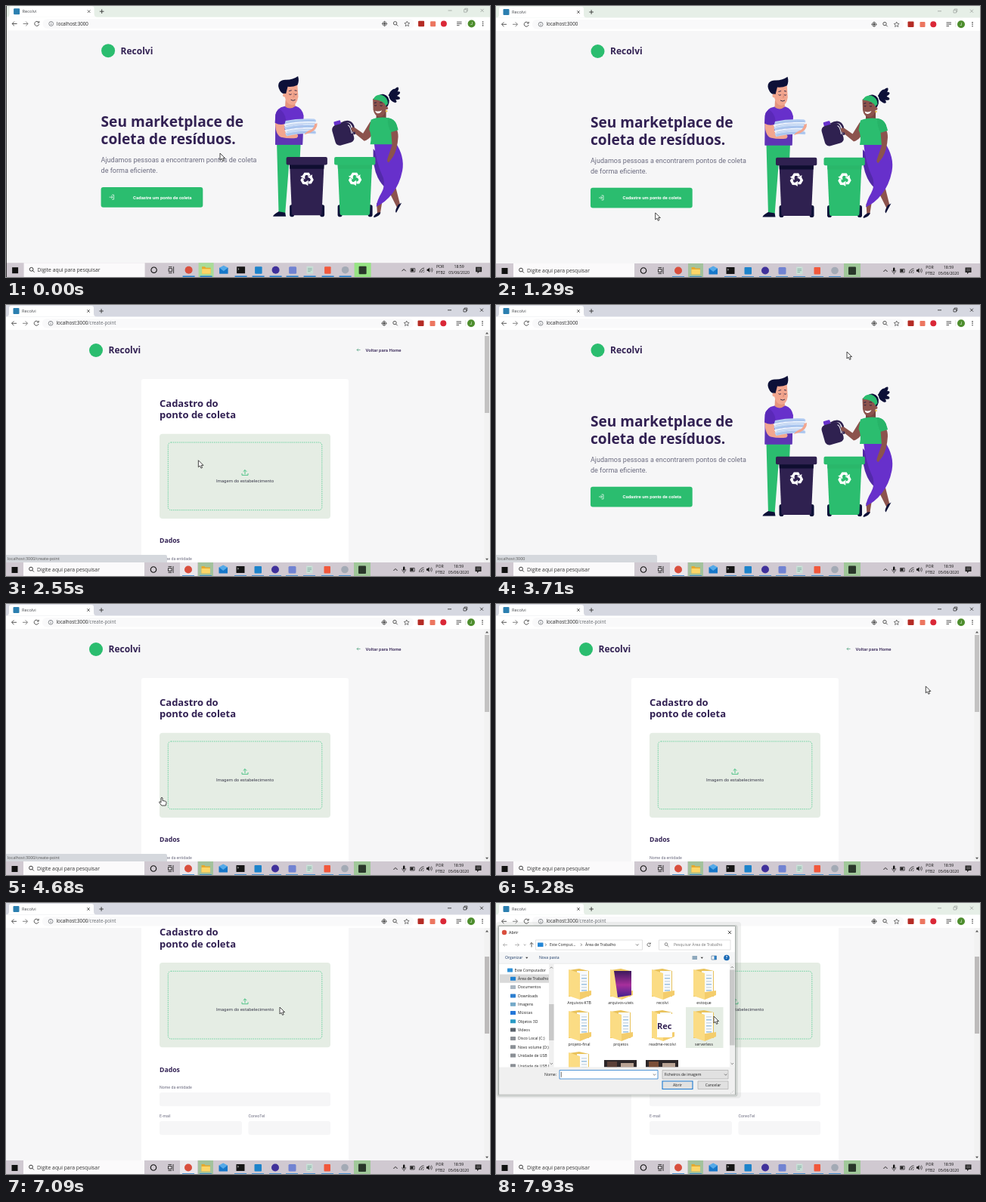
Write an HTML page with a canvas that moves like this. It is 640 px wide and 359 px high and loops after 7990 ms.

```html
<!DOCTYPE html>
<html lang="pt">
<head>
<meta charset="utf-8">
<title>Recolvi</title>
<style>
html, body { margin: 0; width: 100%; height: 100%; overflow: hidden; background: #f6f6f7; }
canvas { display: block; width: 640px; height: 359px; }
</style>
</head>
<body>
<canvas id="stage"></canvas>
<script>
const LOOP = 7990, W = 640, H = 359;
const canvas = document.getElementById('stage');
const ctx = canvas.getContext('2d');
const dpr = Math.max(1, window.devicePixelRatio || 1);
canvas.width = W * dpr;
canvas.height = H * dpr;

const UI = '"Open Sans", sans-serif', BODY = 'Roboto, sans-serif', HEAD = '"Noto Sans", sans-serif';
const INK = '#322153', GREEN = '#2bbd6f', NAVY = '#0d1038', PURPLE = '#6730cb', BIN = '#2f2150';
const BROWN = '#8c534d', SKIN = '#f2a68f', PALE = '#e5ede4', GREY = '#5c6066';

// Drawing helpers
function rect(x, y, w, h, fill, r = 0) {
  ctx.fillStyle = fill;
  ctx.beginPath();
  ctx.roundRect(x, y, w, h, r);
  ctx.fill();
}
function frame(x, y, w, h, color, lw = 0.7, r = 0) {
  ctx.strokeStyle = color;
  ctx.lineWidth = lw;
  ctx.beginPath();
  ctx.roundRect(x, y, w, h, r);
  ctx.stroke();
}
function dot(x, y, r, fill) {
  ctx.fillStyle = fill;
  ctx.beginPath();
  ctx.arc(x, y, r, 0, 7);
  ctx.fill();
}
function oval(x, y, rx, ry, rot, fill) {
  ctx.fillStyle = fill;
  ctx.beginPath();
  ctx.ellipse(x, y, rx, ry, rot, 0, 7);
  ctx.fill();
}
function shape(d, fill) {
  ctx.fillStyle = fill;
  ctx.fill(new Path2D(d));
}
function line(d, color = GREY, lw = 0.9) {
  ctx.strokeStyle = color;
  ctx.lineWidth = lw;
  ctx.stroke(new Path2D(d));
}
function text(s, x, y, size, color, font = UI, weight = 400, align = 'left') {
  ctx.font = `${weight} ${size}px ${font}`;
  ctx.textAlign = align;
  ctx.fillStyle = color;
  ctx.fillText(s, x, y + size * 0.36);
}
function at(x, y, rot, draw) {
  ctx.save();
  ctx.translate(x, y);
  ctx.rotate(rot);
  draw();
  ctx.restore();
}
function lens(x, y, r, color) {
  line(`M${x + r} ${y}a${r} ${r} 0 1 0 ${-2 * r} 0a${r} ${r} 0 1 0 ${2 * r} 0M${x + r * 0.7} ${y + r * 0.7}l2.2 2.2`, color);
}

// Keyed motion: rows of [time, ...values]
function track(keys, t) {
  let i = 0;
  while (i < keys.length - 2 && t >= keys[i + 1][0]) i++;
  const a = keys[i], b = keys[i + 1];
  const k = Math.min(1, Math.max(0, (t - a[0]) / (b[0] - a[0])));
  return a.slice(1).map((v, j) => v + (b[j + 1] - v) * k);
}
const pointer = [
  [0, 283, 195], [130, 283, 195], [250, 360, 190], [420, 518, 262], [620, 400, 338], [920, 209, 312],
  [1250, 212, 275], [1700, 198, 263.5], [1960, 198, 263.5], [2610, 260, 200], [3050, 372, 126], [3400, 464, 62],
  [3720, 464, 62], [4250, 240, 240], [4450, 205, 256], [4700, 205, 256], [5000, 400, 185], [5280, 568, 109],
  [5520, 637, 88], [6050, 637, 90], [6170, 637, 101.7], [6410, 637, 118], [6610, 637, 118],
  [7030, 362, 138], [7180, 362, 138], [7390, 308, 147], [7700, 288, 150], [7990, 288, 150]
];
const scrolling = [[5990, 0], [6050, 8], [6170, 42], [6410, 91.7], [7990, 91.7]];

function drawTabs(active, url) {
  rect(-2, -2, 644, 20, active ? '#d6d8e1' : '#e6efe7');
  shape('M0 15.5Q4 15.5 4 11V4Q4 1 7 1H113Q116 1 116 4V11Q116 15.5 120 15.5Z', '#fff');
  rect(9.5, 4, 8, 8, '#2b7fb0', 1);
  text('Recolvi', 21, 8, 5.7, '#45494d');
  line('M107.2 6.2l3.6 3.6m0-3.6l-3.6 3.6', '#444', 0.8);
  line('M123.3 8h5.6m-2.8-2.8v5.6', '#333');
  const control = active ? '#222' : '#9a9f9b';
  line('M584 6.8h5', control, 0.8);
  line('M605 5.4h3.6v3.6h-3.6zM606.2 5.2v-1.2h3.6v3.6h-1.2', control, 0.7);
  line('M627 4.7l4 4m0-4l-4 4', control, 0.8);

  rect(-2, 15.5, 644, 17.5, '#fff');
  rect(48, 18, 491, 12.5, '#f9f9fa', 6);
  line('M14 24.3h-6.4m2.8-2.9l-2.9 2.9l2.9 2.9', '#444');
  line('M22 24.3h6.4m-2.8-2.9l2.9 2.9l-2.9 2.9', '#777');
  line('M42.6 22.4a3 3 0 1 0 .5 2.6M43.2 20.8v2.2h-2.2', '#444');
  line('M62 24.3a2.9 2.9 0 1 0-5.8 0a2.9 2.9 0 1 0 5.8 0M59.1 23.8v2M59.1 22.2v.7', GREY, 0.7);
  text('localhost:3000', 66.5, 24.2, 6.2, '#222');
  if (url) text(url, 66.5 + ctx.measureText('localhost:3000').width, 24.2, 6.2, '#666a70');

  line('M502.7 24.3a2.7 2.7 0 1 0-5.4 0a2.7 2.7 0 1 0 5.4 0M500 20.6v7.4M496.3 24.3h7.4', '#444', 0.7);
  dot(500, 24.3, 1.2, '#444');
  lens(514, 23.6, 2.2, '#444');
  line('M529.7 21l1 2.2 2.4.3-1.8 1.6.5 2.4-2.1-1.2-2.1 1.2.5-2.4-1.8-1.6 2.4-.3z', '#444', 0.7);
  rect(544.5, 20.5, 8, 7.5, '#b52c25', 1);
  rect(560.5, 21, 7, 7, '#ec7660', 1);
  dot(578.3, 24.3, 4, '#da2837');
  line('M595.5 22h6.5m-6.5 2.2h6.5m-6.5 2.3h3.5', '#444');
  line('M607.5 20v8', '#ddd', 0.6);
  dot(615, 24.3, 5, '#4d8d2d');
  text('J', 615, 24.3, 5, '#fff', BODY, 400, 'center');
  for (const dy of [-2.4, 0, 2.4]) dot(630, 24.3 + dy, 0.8, '#444');
}

function drawTaskbar(active, idle) {
  rect(-2, 341, 644, 22, '#d0c9d1');
  rect(7.5, 347, 8, 8, '#111');
  rect(23, 341, 160, 22, '#fbfafb');
  lens(33, 349.6, 2.4, '#222');
  text('Digite aqui para pesquisar', 41, 350.6, 6.8, '#333');
  line('M198.7 350.5a3.7 3.7 0 1 0-7.4 0a3.7 3.7 0 1 0 7.4 0', '#111', 1.1);
  line('M214.5 348.5h4.5v4h-4.5zM214.5 346.5h4.5M214.5 354.5h4.5M221 346v9', '#111', 0.8);
  if (active) rect(230, 341, 23, 22, '#ebe7eb');
  rect(254, 341, 20, 22, idle ? '#a9dc98' : '#a3c29c');
  rect(460, 341, 22, 22, idle ? '#97e484' : '#a1c89a');
  dot(241, 350.5, 5, '#d94f3e');
  shape('M258.5 346h4l1 1.5h6.5v8h-11.5z', '#e6a92c');
  rect(258.5, 349, 11.5, 6.5, '#fcd667', 0.5);
  rect(281.5, 347.5, 11.5, 8, '#1677c9', 0.5);
  shape('M281.5 347.5L287.2 344.5L293 347.5L287.2 352Z', '#54a9e8');
  rect(304.5, 346, 11, 9, '#151515', 0.5);
  line('M306 348.3l1.5 1-1.5 1', '#fff', 0.6);
  rect(328.5, 346, 9.5, 9.5, '#1d83ca', 1);
  dot(356, 350.5, 5, '#40319b');
  rect(373.5, 346, 10, 9.5, '#7183d2', 1.5);
  rect(397, 345.5, 8.5, 10, '#c8dfd6', 0.6);
  line('M398.5 348.5h5.5m-5.5 2h5.5m-5.5 2h3.5', '#65948c', 0.6);
  rect(420.5, 346, 8.5, 9.5, '#f1583c', 1);
  dot(448, 350.5, 4.8, '#a3aab5');
  rect(466, 345.5, 10, 10.5, '#29372a', 1);
  for (const x of [241, 264, 310, 333, 356, 378, 401, 425, 448]) rect(x - 8, 358.2, 16, 2, '#2a82cf');
  const up = idle ? 525.5 : 515;
  line(`M${up - 2.6} 352l2.6-2.6 2.6 2.6`, '#111', 0.9);
  if (!idle) {
    rect(525, 346.5, 2.4, 5.2, '#111', 1.2);
    line('M523.7 350q0 3.5 2.5 3.5t2.5-3.5M526.2 353.5v2', '#111', 0.6);
  }
  frame(534.5, 348.5, 5.6, 4.5, '#111');
  rect(535.2, 349.2, 3.2, 3.1, '#111');
  line('M546.5 354a6 6 0 0 1 6-6M548.8 354a3.6 3.6 0 0 1 3.7-3.6M551 354l1.5-1.5', '#222', 0.8);
  shape('M556 349.2h1.5l2-2v6.6l-2-2H556z', '#111');
  line('M560.8 348.6q1.4 1.9 0 3.8M562.4 347.5q2.2 3 0 6', '#111', 0.6);
  text('POR', 573.5, 346.2, 5.2, '#111', UI, 400, 'center');
  text('PTB2', 574, 354.2, 5.2, '#111', UI, 400, 'center');
  text('18:59', 598.5, 346.2, 5.2, '#111', UI, 400, 'center');
  text('05/06/2020', 598.5, 354.2, 5.2, '#111', UI, 400, 'center');
  shape('M620.5 346.5h8v6.5h-3.5l-2 2.2v-2.2h-2.5z', '#222');
  line('M622 348.7h5m-5 2h5', '#d0c9d1', 0.5);
}

function recycle(x, y) {
  for (let k = 0; k < 3; k++) at(x, y, k * Math.PI * 2 / 3, () => {
    line('M-5.2 -2.4L-2.5 -6.6H1.8L3.2 -4.2', '#fff', 3.4);
    shape('M.7 -2.4L7.2 -5.8L6.3 .2Z', '#fff');
  });
}
function bin(x, color, shade) {
  rect(x + 4.5, 264, 6, 16, NAVY, 2.8);
  rect(x + 44.5, 264, 6, 16, NAVY, 2.8);
  shape(`M${x + 4.5} 209H${x + 50}L${x + 47} 275Q${x + 46.8} 278 ${x + 44} 278H${x + 10}Q${x + 7.6} 278 ${x + 7.4} 275Z`, color);
  shape(`M${x + 4.5} 210H${x + 50}L${x + 49.7} 216.5H${x + 4.8}Z`, shade);
  rect(x, 200.8, 54.3, 10.4, color, 2);
  recycle(x + 27.3, 229.8);
}

function drawMan() {
  shape('M357.5 183H389L388 205H374L368.5 277H360Z', GREEN);
  shape('M360 273L368.5 274.5L369.5 279.5H352.5Q352.5 277 360 273Z', NAVY);
  shape('M363 135Q372 131.5 383 133.5Q391 136 393 146L391.5 184.5H355.5V150Q355 139 363 135Z', PURPLE);
  shape('M356 165H392L391.5 184.5H355.5Z', '#5e35b4');
  shape('M369 125H381L382 133.5Q375 139 368.5 134Z', '#e5937d');
  shape('M367.5 106Q378 103 384.8 106L385.8 121Q384 132 377.5 132Q370 131 368 121Z', SKIN);
  shape('M362 113.5Q357.5 106 361 101.5Q364.5 98 370 98.5Q379 98.5 385.5 93.8Q387.5 100 384.8 105.5Q378 108.5 372 107.5L369.5 117Q364.5 117.5 362 113.5Z', NAVY);
  dot(367.8, 119, 2.4, SKIN);
  line('M373.5 113.5l3.6-1M381 112.5l3 .6M373.6 117.5q1.6 1.6 3.4 0M381 117.5q1.5 1.6 3 0M376 125q3 2.2 6 0', NAVY, 0.8);
  line('M379.6 116l1 5h-2', '#d57f69', 0.7);

  shape('M355.5 153Q355 171 363 174.5Q374 177 384 175.5Q388 172 382 168.5L368 165V154Z', SKIN);
  for (let i = 0; i < 5; i++) {
    const y = 152.6 + i * 3.9, x = 366 + i * 0.6;
    shape(`M${x} ${y + 0.8}Q386 ${y - 3.4} 407 ${y - 2.4}Q411 ${y - 0.5} 408.5 ${y + 2}Q388 ${y + 0.6} ${x + 2} ${y + 5}Z`, i % 2 ? '#e9f1fc' : '#b8d0f3');
    line(`M${x + 3} ${y + 3}Q387 ${y - 1} 408 ${y}`, '#87a9df', 0.6);
  }
  shape('M411 156Q411.5 164 402 168.5L394 171Q396 167 403 164.5Q407 162 407.5 157Z', SKIN);
  shape('M355.5 149Q355 140 361.5 137.5Q368 142 369.5 151L368 157Q361 159 355 155.5Z', '#5a29b8');
}

function drawWoman() {
  for (const [x, y, r] of [[511, 119.5, 0.1], [510, 115.5, -0.9], [514.5, 113.5, -0.95], [515, 117.5, -0.45], [514.5, 122, 0.2], [511, 124.5, 0.7]])
    oval(x, y, 6, 2.6, r, NAVY);
  shape('M489.5 262L497 259L494.2 276L490.5 277.5Z', BROWN);
  shape('M494.8 274Q494 279 486 281Q484 279 491 274.5Z', NAVY);
  shape('M507 249L515 242L520.5 264L517 269Z', BROWN);
  shape('M522.5 261.5L515.5 274.5Q512.5 273 518 264Z', NAVY);
  shape('M485 190Q484 214 491 228Q496 238 503 243L507 214Z', '#5229a8');
  shape('M486 181H514Q527 200 523.5 219Q520 237 510 249.5Q501 261 489 266.5Q490 258 496 248Q501 239 498.5 229Q488 207 486 181Z', PURPLE);

  shape('M481 154L489 160Q483 177 473 179.5L456.5 166Q456.5 162 460 161.5L471.5 169.5Z', BROWN);
  shape('M489 139H502V151Q494 156 489 151Z', '#774540');
  shape('M482 151.5Q492 147 505 149Q513 150 516 158L514 184H481Q483.5 172 479.5 164Z', GREEN);
  shape('M508 160Q518 160 518 174Q517 190 511.5 200L505.5 208Q502 207 504.5 201L510 185Z', BROWN);
  shape('M504 149Q515 150 518 165L508.5 168Q504 160 504 149Z', '#27b468');

  oval(497, 127.5, 9, 10, 0.2, NAVY);
  shape('M484.5 124Q489 119 498 123Q503 129 502 137Q500.5 146.5 494 147.5Q486.5 147 485 138Z', BROWN);
  shape('M485 124.5Q488 117.5 496 118.5Q504 121 504.5 130L501.5 133Q499 125.5 485 124.5Z', GREEN);
  dot(502.5, 136, 2, BROWN);
  dot(502.5, 140, 1.3, '#f2c14e');
  line('M486.3 129.3l3-.7M493.5 129q2-1 3.6.3M486.6 132.3q1.4 1.3 2.8 0M494 132.5q1.6 1.4 3 0', NAVY, 0.8);
  shape('M487.5 139.5Q492 141.5 496.5 139Q494.5 143.5 490.5 143Q488 142.5 487.5 139.5Z', '#fff');

  at(445, 169, -0.28, () => {
    rect(-8, -17.5, 9, 6, PURPLE, 1.2);
    rect(-13, -12.5, 25.5, 27.5, BIN, 6);
    line('M1 -12.5Q14 -16 15.5 -5L14 6', BIN, 2.6);
    line('M9 -8Q12 -7 11 4', '#f6f6f7', 1.1);
  });
  oval(459, 164.5, 3.5, 2.5, 0.8, BROWN);
}

function drawHome() {
  dot(134.5, 60, 9, GREEN);
  text('Recolvi', 151, 60, 12, INK, HEAD, 700);
  text('Seu marketplace de', 125, 154, 19.1, INK, HEAD, 700);
  text('coleta de resíduos.', 125, 177.3, 19.1, INK, HEAD, 700);
  text('Ajudamos pessoas a encontrarem pontos de coleta', 125, 204.6, 9, '#6c6c80', BODY);
  text('de forma eficiente.', 125, 218.6, 9, '#6c6c80', BODY);
  rect(125, 240.8, 134.7, 26.7, GREEN, 3);
  line('M136 254h4.4m-1.8-1.9l1.9 1.9-1.9 1.9M139.5 251h2.5v6h-2.5', '#fff', 0.7);
  text('Cadastre um ponto de coleta', 167.5, 254.2, 6, '#fff', BODY, 700);
  drawMan();
  drawWoman();
  bin(370, BIN, '#0f0e30');
  bin(433.5, GREEN, '#2ab76a');
}

function drawForm(scroll) {
  ctx.save();
  ctx.beginPath();
  ctx.rect(-2, 33, 644, 308);
  ctx.clip();
  ctx.translate(0, -scroll);
  dot(119, 60, 9, GREEN);
  text('Recolvi', 135.5, 60, 12, INK, HEAD, 700);
  line('M468.5 59.5h-4.5m1.9-1.9l-1.9 1.9 1.9 1.9', '#4b9f7b', 0.7);
  text('Voltar para Home', 475.5, 59.7, 6, INK, BODY, 500);
  rect(179, 98, 274, 400, '#fff', 3);
  text('Cadastro do', 203, 130, 13, INK, HEAD, 700);
  text('ponto de coleta', 203, 145.6, 13, INK, HEAD, 700);
  rect(203, 170.7, 226, 112.3, PALE, 4);
  ctx.setLineDash([1.5, 1.2]);
  frame(214.3, 182, 203.5, 89.7, '#4ecb90', 0.8, 4);
  ctx.setLineDash([]);
  line('M312 223v2.4h8v-2.4M316 224v-5.4m-2.3 2.2l2.3-2.3 2.3 2.3', '#3fbf7e', 0.9);
  text('Imagem do estabelecimento', 316, 233, 6, '#3d3d4d', BODY, 400, 'center');
  text('Dados', 203, 312.3, 8.7, INK, HEAD, 700);
  const field = (label, x, y, w) => {
    text(label, x, y, 5.25, '#6c6c80', BODY);
    rect(x, y + 6.7, w, 18.3, '#f6f6f7', 3);
  };
  field('Nome da entidade', 203, 336, 226);
  field('E-mail', 203, 374, 109);
  field('ConvoTel', 320.5, 374, 108.5);
  ctx.restore();
}

function drawScrollbar(scroll, t) {
  rect(632.5, 33, 10, 308, '#f2f2f2');
  const grip = t < 5460 ? '#c3c2c2' : t < 5850 ? '#a9a7a7' : t < 6640 ? '#7f797a' : '#bdbbbb';
  rect(633, 41 + scroll * 0.327, 6, 102, grip);
  shape('M634 38.5l2-2.4 2 2.4z', '#555');
  shape('M634 335.8l2 2.4 2-2.4z', '#555');
}

function statusBar(t) {
  const path = '/create-point';
  let label = '';
  if (t >= 1300 && t < 3050) label = 'localhost:3000' + path;
  else if (t >= 3050 && t < 3960) label = 'localhost:3000';
  else if (t >= 4330 && t < 5220) label = 'localhost:3000' + path;
  if (!label) return;
  rect(-1, 331, t < 1960 ? 75 : 214, 10, '#d5d8dd', [0, 2, 0, 0]);
  text(label, 2, 336, 5.4, '#555');
}

function folder(x, y) {
  shape(`M${x - 14} ${y + 2}L${x} ${y}L${x + 13} ${y + 3}V${y + 37}H${x - 14}Z`, '#e9c25b');
  rect(x - 3, y + 3, 15, 32, '#f8fafc');
  for (let i = 0; i < 6; i++) rect(x + 3, y + 8 + i * 4, 7, 1.4, i % 2 ? '#9cc1e0' : '#d0dce6');
  shape(`M${x - 14} ${y + 1}L${x + 1} ${y + 6}V${y + 41}L${x - 14} ${y + 36}Z`, '#fbdc84');
  shape(`M${x + 1} ${y + 31}L${x + 16} ${y + 29}V${y + 35}L${x + 1} ${y + 41}Z`, '#f4cd6c');
}

function drawFiles() {
  const names = ['Arquivos-KTB', 'arquivos-uteis', 'recolvi', 'estoque', 'projeto-final', 'projetos', 'readme-recolvi', 'serverless', ''];
  ctx.save();
  ctx.beginPath();
  ctx.rect(78, 81, 231, 136.5);
  ctx.clip();
  rect(251, 138, 49.5, 54, PALE);
  names.forEach((name, i) => {
    const x = 110 + i % 4 * 55, y = 87 + Math.floor(i / 4) * 55;
    folder(x, y);
    if (i === 1) {
      const g = ctx.createLinearGradient(0, y, 0, y + 36);
      g.addColorStop(0, '#2b1552');
      g.addColorStop(0.6, '#a72f9c');
      g.addColorStop(1, '#4c2390');
      shape(`M${x - 9} ${y + 3}H${x + 14}V${y + 35}L${x - 4} ${y + 38}Z`, g);
    }
    if (i === 6) {
      rect(x - 8, y + 5, 21, 31, '#fff');
      text('Rec', x - 7, y + 21, 11, INK, HEAD, 700);
      shape(`M${x - 14} ${y + 1}L${x - 7} ${y + 4}V${y + 39}L${x - 14} ${y + 36}Z`, '#fbdc84');
    }
    text(name, x, y + 45.3, 5.1, '#222', UI, 400, 'center');
  });
  for (const [x, tone] of [[143, '#5b4038'], [198, '#7b4f38']]) {
    rect(x, 208, 43, 12, '#2c2628');
    rect(x + 4, 210, 13, 10, tone);
    rect(x + 22, 212, 17, 8, '#b9a394');
  }
  ctx.restore();
}

function drawNav() {
  const items = ['Este Computador', 'Área de Trabalho', 'Documentos', 'Downloads', 'Imagens', 'Músicas', 'Objetos 3D',
    'Vídeos', 'Disco Local (C:)', 'Novo volume (D:)', 'Unidade de USB', 'Unidade de USB (F:)'];
  const tones = ['#2f92d8', '#1f82d2', '#a9b6c2', '#2c7ed0', '#74a9c8', '#2377d8', '#2a9bc5', '#5b636c'];
  ctx.save();
  ctx.beginPath();
  ctx.rect(5, 81, 65, 136.5);
  ctx.clip();
  rect(5, 94.5, 65, 11.2, '#d9d9d9');
  items.forEach((name, i) => {
    const x = i ? 19 : 15, y = 89 + i * 11.3 + (i === 11 ? 2.5 : 0);
    rect(x, y - 2.5, 7, 5, tones[i] || '#8b9096', 0.6);
    text(name, x + (i ? 10 : 9.5), y, 5.1, '#222');
  });
  ctx.restore();
  rect(70, 81, 6.5, 136.5, '#f0f0f0');
  rect(70, 134, 6.5, 48, '#c9c9c9');
  line('M71.6 86.5l1.7-1.7 1.7 1.7M71.6 212l1.7 1.7 1.7-1.7', '#555', 0.7);
}

function drawDialog(t) {
  rect(0, 25, 324, 233.5, 'rgba(90,105,95,.09)', 4);
  rect(1.5, 29, 318, 227.5, 'rgba(70,85,75,.18)', 3);
  rect(3.5, 30.5, 313, 223.5, '#7f8682');
  rect(4, 31, 312, 222.5, '#fff');
  dot(11, 39, 3.2, '#d94f3e');
  text('Abrir', 17, 39, 5.4, '#111');
  line('M306.8 36.8l4.2 4.2m0-4.2l-4.2 4.2', '#222', 0.8);
  line('M15 55.5h-5.5m2.2-2.2l-2.2 2.2 2.2 2.2M25 55.5h5.5m-2.2-2.2l2.2 2.2-2.2 2.2', '#a8a8a8', 0.8);
  line('M36.7 54.8l1.4 1.4 1.4-1.4', '#666', 0.6);
  line('M47 58.5v-6m-2.3 2.3l2.3-2.3 2.3 2.3', '#333', 0.8);
  frame(52.5, 49, 141, 13, '#d5d5d5');
  rect(55, 52.5, 7.5, 5.5, '#2386d6', 0.5);
  line('M65 53.7l1.5 1.6-1.5 1.6M112 53.7l1.5 1.6-1.5 1.6M185 54.5l1.8 1.8 1.8-1.8', '#444', 0.7);
  text('Este Comput...', 71, 55.4, 5.1, '#222');
  text('Área de Trabalho', 118, 55.4, 5.1, '#222');
  line('M204 54a2.2 2.2 0 1 0 .3 2M204.3 52.4v1.9h-1.8', '#444', 0.7);
  frame(215.5, 49, 94.5, 13, '#d5d5d5');
  lens(225, 54.6, 1.8, '#777');
  text('Pesquisar Área de Trabalho', 235, 55.4, 5.05, '#737373');

  rect(4, 65, 312, 15, '#f5f6f7');
  line('M4 80.3H316', '#dedede', 0.6);
  text('Organizar', 12, 72.5, 5.1, '#1b3a66');
  shape('M39 71.8h3.4l-1.7 1.9zM270.6 71.8h3.4l-1.7 1.9z', '#333');
  text('Nova pasta', 57, 72.5, 5.1, '#1b3a66');
  rect(259.5, 70, 6.5, 5, '#8fa9bd');
  frame(285, 70, 6.5, 5, '#58799a');
  rect(288.5, 70, 3, 5, '#2d7ec2');
  dot(305, 72.5, 3.8, '#1869b5');
  text('?', 305, 72.5, 5, '#fff', UI, 700, 'center');

  if (t >= 7510) drawNav();
  if (t >= 7570) drawFiles();
  rect(309, 81, 6.5, 136.5, '#f0f0f0');
  rect(309, 88.5, 6.5, 100, '#c9c9c9');
  line('M310.6 86l1.7-1.7 1.7 1.7M310.6 212l1.7 1.7 1.7-1.7', '#555', 0.7);

  rect(4, 217.5, 312, 36, '#f0f0f0');
  text('Nome:', 64, 227.3, 5.2, '#222');
  rect(84, 221.5, 130, 11.5, '#fff');
  frame(84, 221.5, 130, 11.5, '#2a7fd0', 0.8);
  line('M86.3 223.7v7', '#111', 0.6);
  rect(220, 221.5, 87, 11.5, '#e1e1e1');
  frame(220, 221.5, 87, 11.5, '#adadad');
  line('M207.8 226.5l1.7 1.7 1.7-1.7M302 226.5l1.7 1.7 1.7-1.7', '#444', 0.7);
  text('Ficheiros de imagem', 222.5, 227.3, 5.1, '#222');
  rect(220, 236, 40, 10.5, '#e1e1e1');
  frame(220, 236, 40, 10.5, '#1c7ad2', 1.1);
  rect(267, 236, 40, 10.5, '#e1e1e1');
  frame(267, 236, 40, 10.5, '#adadad');
  text('Abrir', 240, 241.2, 5.1, '#222', UI, 400, 'center');
  text('Cancelar', 287, 241.2, 5.1, '#222', UI, 400, 'center');
  for (let i = 0; i < 3; i++) dot(314 - i * 1.7, 249 + i * 1.5, 0.4, '#999');
}

function drawPointer(t) {
  const [x, y] = track(pointer, t);
  const hand = (t >= 1300 && t < 2080) || (t >= 3360 && t < 3600) || (t >= 4330 && t < 4720);
  ctx.save();
  ctx.translate(x, y);
  ctx.lineJoin = 'round';
  const p = new Path2D(hand
    ? 'M0 1Q1 -.6 2 1V4.5L5.5 5.2Q7.3 5.6 7 7.5L6.2 11H.8L-2.4 6.8Q-2.5 5.5 -1 6L0 7Z'
    : 'M0 0V9L2.1 7.2L3.6 10.4L5.2 9.7L3.8 6.6H6.6Z');
  ctx.fillStyle = '#fff';
  ctx.strokeStyle = '#333';
  ctx.lineWidth = 0.9;
  ctx.fill(p);
  ctx.stroke(p);
  ctx.restore();
}

function render(t) {
  const idle = t < 980, active = t >= 1890 && t < 7390;
  const form = (t >= 1960 && t < 3620) || t >= 4660;
  const scroll = track(scrolling, t)[0];
  ctx.setTransform(dpr, 0, 0, dpr, 0, 0);
  ctx.lineJoin = 'miter';
  rect(0, 0, W, H, '#f6f6f7');
  ctx.save();
  if (idle) ctx.translate(0.6, -0.8);
  if (form) {
    drawForm(scroll);
    drawScrollbar(scroll, t);
  } else drawHome();
  statusBar(t);
  drawTabs(active, form ? '/create-point' : '');
  drawTaskbar(t >= 1890, idle);
  if (t >= 7450) drawDialog(t);
  ctx.restore();
  if (idle) rect(0, 0, 0.8, H, '#111');
  drawPointer(t);
}

const start = performance.now();
function tick() {
  render((performance.now() - start) % LOOP);
  requestAnimationFrame(tick);
}
tick();
</script>
</body>
</html>
```
